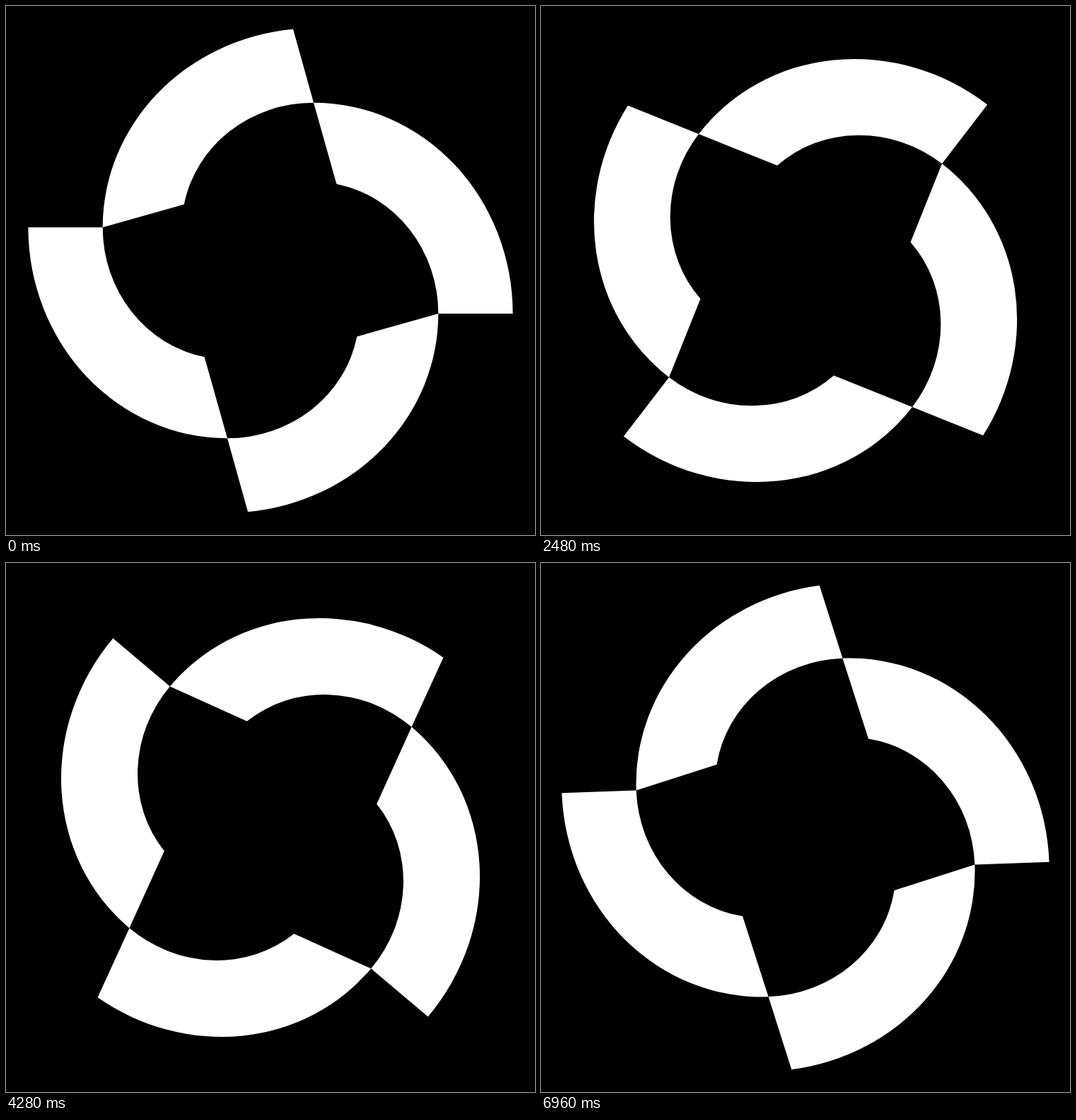
An HTML page for the animation above (7000 ms loop, 748 by 748 pixels).

```html
<!DOCTYPE html>
<html lang="en">
<head>
<meta charset="utf-8">
<title>Turning wheel</title>
<style>
  html, body { margin: 0; width: 100%; height: 100%; overflow: hidden; background: #000; }
  svg { display: block; width: 100vw; height: 100vh; }
</style>
</head>
<body>
<svg viewBox="0 0 748 748"><g id="wheel" fill="#fff"></g></svg>
<script>
const LOOP = 7000, STEP = 40;
const OFFSET = 61;                       // blade centre, right of and below the hub
const OUTER = { rx: 281.6, ry: 298.3 };
const INNER = { rx: 176.3, ry: 186.4 };
const INNER_START = 10.59;               // degrees clockwise from the top
const OUTER_ENDS = [90, 84.42];          // alternate blades are cut short
const wheel = document.getElementById('wheel');

function point({ rx, ry }, deg) {
  const a = deg * Math.PI / 180;
  return `${OFFSET + rx * Math.sin(a)} ${OFFSET - ry * Math.cos(a)}`;
}

function arcTo({ rx, ry }, deg, sweep) {
  return `A${rx} ${ry} 0 0 ${sweep} ${point({ rx, ry }, deg)}`;
}

function blade(k) {
  const path = document.createElementNS('http://www.w3.org/2000/svg', 'path');
  path.setAttribute('d',
    'M' + point(OUTER, 0) + arcTo(OUTER, OUTER_ENDS[k % 2], 1) +
    'L' + point(INNER, 90) + arcTo(INNER, INNER_START, 0) + 'Z');
  path.setAttribute('transform', `rotate(${k * 90})`);
  return path;
}

wheel.append(...[0, 1, 2, 3].map(blade));

function draw(ms) {
  const t = Math.floor((ms % LOOP) / STEP) * STEP;
  wheel.setAttribute('transform', `translate(374 374) rotate(${360 * t / LOOP})`);
}

function tick(now) {
  draw(Math.max(0, now));
  requestAnimationFrame(tick);
}

draw(0);
requestAnimationFrame(tick);
</script>
</body>
</html>
```
